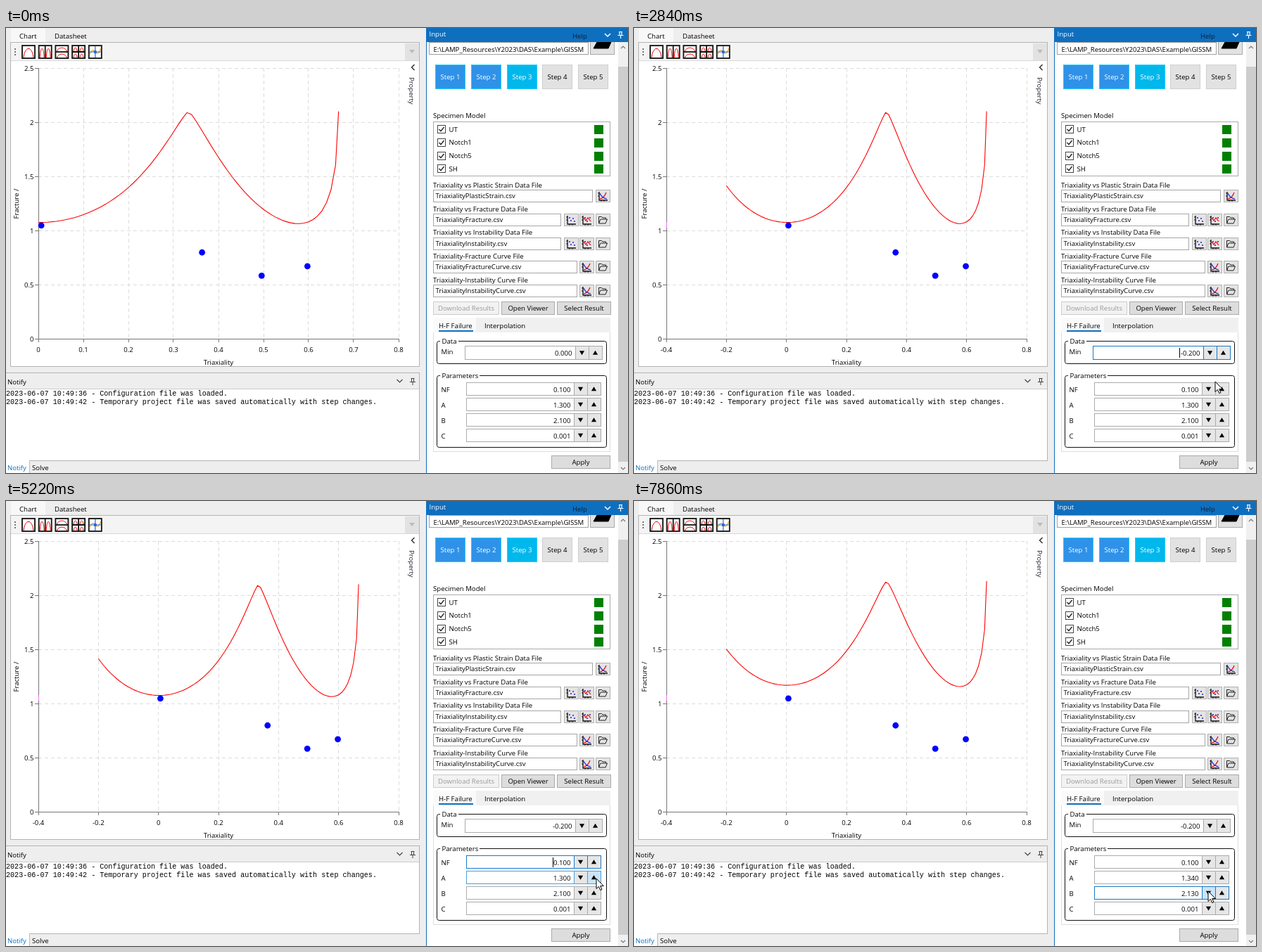
Animation, 884 px wide and 633 px high, one loop 7990 ms. Source, as an HTML page:

```html
<!DOCTYPE html>
<html lang="en">
<head>
<meta charset="utf-8">
<title>Fracture curve editor</title>
<style>
  html, body { margin: 0; width: 100%; height: 100%; overflow: hidden; background: #eee; }
  svg { display: block; width: 884px; height: 633px; }
  text { font: 9.6px "Open Sans", "Noto Sans", sans-serif; white-space: pre; }
  .log { font: 10.1px "Liberation Mono", monospace; }
</style>
</head>
<body>
<svg viewBox="0 0 884 633"><g id="still"></g><g id="live"></g></svg>
<script>
const LOOP = 7990, BLINK = 530;

// Drawing helpers; text is placed by its vertical centre, boxes by whole pixels.
const text = (x, cy, s, fill = '#000', anchor = 'start', extra = '') =>
  `<text x="${x}" y="${cy + 3.5}" fill="${fill}" text-anchor="${anchor}" ${extra}>${s}</text>`;
const rect = (x, y, w, h, fill) => `<rect x="${x}" y="${y}" width="${w}" height="${h}" fill="${fill}"/>`;
const box = (x, y, w, h, fill, stroke, rx = 0) =>
  `<rect x="${x + .5}" y="${y + .5}" width="${w - 1}" height="${h - 1}" rx="${rx}" fill="${fill}" stroke="${stroke}"/>`;
const path = (d, stroke, width = 1, fill = 'none', extra = '') =>
  `<path d="${d}" stroke="${stroke}" stroke-width="${width}" fill="${fill}" ${extra}/>`;
const at = (x, y, s) => `<g transform="translate(${x} ${y})">${s}</g>`;
const dot = (x, y, r, fill) => `<circle cx="${x}" cy="${y}" r="${r}" fill="${fill}"/>`;
const button = (x, y, w, h, label, fill = '#ddd', stroke = '#aaa', color = '#000') =>
  box(x, y, w, h, fill, stroke) + text(x + w / 2, y + h / 2, label, color, 'middle');

// Icons
const arch = (x, y, w, h) => path(`M${x} ${y + h}C${x + w * .15} ${y - h * .3} ${x + w * .85} ${y - h * .3} ${x + w} ${y + h}`, '#e00');
const frame = `<rect x="1" y="1" width="18" height="18" fill="#fff" stroke="#111" stroke-width="1.8"/>`;
const axes = path('M5 3V15H17M3.5 5H5M3.5 9H5M8 15V16.5M12 15V16.5', '#111', 1.3);
const icons = {
  curve: axes + path('M6 13Q12 12 15 4', '#e00', 1.2) + path('M6 5Q9 12 16 13', '#22c', 1.2),
  points: axes + [[8, 6], [10, 10], [13, 7], [15, 11]].map(p => dot(...p, 1, '#22c')).join(''),
  fit: axes + path('M6 6L9 10 12 6 16 11', '#e00', 1.2) + [[8, 6], [11, 11], [15, 6]].map(p => dot(...p, 1, '#22c')).join(''),
  folder: path('M4.5 14V4.5H8.5L10 6H14.5V8M4.5 14L7 8H16.5L14 14Z', '#222'),
};

function toolbar() {
  const views = [
    arch(3, 5, 14, 13),
    path('M10 1V19', '#111', 1.8) + arch(2.5, 5, 6, 13) + arch(11.5, 5, 6, 13),
    path('M1 10H19', '#111', 1.8) + arch(3, 4, 14, 5) + arch(3, 13, 14, 5),
    path('M10 1V19M1 10H19', '#111', 1.8) + [3, 12].map(x => arch(x, 4, 5, 5) + arch(x, 13, 5, 5)).join(''),
    path('M2 14Q6 4 10 10T18 5', '#e9a820', 1.3) + path('M10 2V18M2 10H18', '#2468d8', 1.2) + dot(10, 10, 2.2, '#2468d8'),
  ];
  return [29, 33, 37].map(y => rect(12, y, 2, 2, '#777')).join('') +
    views.map((v, i) => at(22 + 23.7 * i, 24, frame + v)).join('');
}

function leftSide() {
  return rect(0, 0, 597, 633, '#eee') + rect(7, 0, 49, 20, '#f8f8f8') +
    text(19, 11, 'Chart') + text(69, 11, 'Datasheet') +
    box(6, 20, 582, 462, '#fff', '#b4b4b4') + rect(7, 21, 580, 25, '#f4f4f4') + rect(7, 46, 580, 1, '#d8d8d8') +
    toolbar() + rect(567, 22, 20, 24, '#e2e2e2') + path('M573 31H581L577 36Z', 'none', 0, '#bbb') +
    path('M580.5 52L576.5 56 580.5 60', '#222', 1.3) +
    text(0, 0, 'Property', '#223', 'start', 'transform="translate(576 70) rotate(90)"') +
    text(0, 0, 'Fracture /', '#000', 'middle', 'transform="translate(14 250) rotate(-90)"') +
    text(302, 475, 'Triaxiality', '#000', 'middle') +
    box(-1, 490, 589, 126, '#fff', '#b4b4b4') + rect(0, 491, 587, 23, '#eee') + rect(0, 513, 587, 1, '#ccc') +
    text(2, 503, 'Notify') + path('M555.5 500L559.5 504 563.5 500', '#444', 1.2) +
    path('M575.5 498.5H580.5M576.5 498V503M579.5 498V503M574 503.5H582M578 504V508', '#444') +
    text(0, 519, '2023-06-07 10:49:36 - Configuration file was loaded.', '#000', 'start', 'class="log"') +
    text(0, 531, '2023-06-07 10:49:42 - Temporary project file was saved automatically with step changes.', '#000', 'start', 'class="log"') +
    rect(0, 615, 33, 18, '#fff') + rect(33, 615, 1, 18, '#bbb') +
    text(2, 625, 'Notify', '#0a70c0') + text(37, 625, 'Solve');
}

function fileRow(label, cy, name, right, kinds) {
  const y = Math.round(cy + 7);
  return text(607, cy, label) + box(607, y, right - 607, 18, '#fff', '#a6a6a6') + text(610.5, y + 8.5, name) +
    kinds.map((k, i) => {
      const x = 838 - 22.7 * (kinds.length - 1 - i);
      return at(Math.round(x), y, box(0, 0, 21, 18, '#e4e4e4', '#b0b0b0') + icons[k]);
    }).join('');
}

function group(y, h, title, gap) {
  return box(612, y, 242, h, 'none', '#111', 3) + rect(617, y - 1, gap, 4, '#fff') + text(619.5, y, title);
}

function rightSide() {
  const steps = [1, 2, 3, 4, 5].map(n => {
    const fill = n < 3 ? '#2f92e8' : n == 3 ? '#00b8ec' : '#e2e2e2';
    return button(Math.round(559.3 + 50.75 * n), 52, 43, 35, 'Step ' + n, fill, n < 4 ? '#20cdf8' : '#cfcfcf', n < 4 ? '#fff' : '#000');
  }).join('');
  const models = ['UT', 'Notch1', 'Notch5', 'SH'].map((name, i) => {
    const cy = 144.3 + 18.6 * i, y = Math.round(cy - 6);
    return box(613, y, 12, 12, '#fff', '#444') + path(`M615.5 ${y + 6}L618 ${y + 8.7} 622.5 ${y + 3}`, '#222', 1.4) +
      text(629.5, cy, name) + rect(836, y, 13, 13, '#008000');
  }).join('');
  return rect(597, 0, 287, 633, '#fff') + rect(597, 0, 1, 633, '#0f6fbf') +
    box(601, 20, 227, 18, '#fff', '#a0a0a0') + text(607.5, 30.5, 'E:\\LAMP_Resources\\Y2023\\DAS\\Example\\GISSM') +
    box(830, 16, 35, 22, '#e2e2e2', '#aaa') + path('M835 29L840 20H860L856 29Z', '#000', 1, '#000') +
    rect(597, 0, 287, 20, '#0f6fbf') + text(601.5, 8, 'Input', '#fff') + text(805, 11, 'Help', '#062038') +
    path('M851 8L855 12 859 8', '#fff', 1.5) + path('M871 5.5H876M872 5V10M875 5V10M869.5 10.5H877.5M873.5 11V15', '#fff', 1.2) +
    rect(870, 20, 14, 613, '#f0f0f0') + rect(870, 55, 14, 562, '#cdcdcd') +
    path('M874 29L877 26 880 29M874 625L877 628 880 625', '#777', 1.2) +
    steps + text(607, 124, 'Specimen Model') + box(607, 133, 252, 78, '#fff', '#aaa') + models +
    fileRow('Triaxiality vs Plastic Strain Data File', 223, 'TriaxialityPlasticStrain.csv', 834, ['curve']) +
    fileRow('Triaxiality vs Fracture Data File', 257, 'TriaxialityFracture.csv', 789, ['points', 'fit', 'folder']) +
    fileRow('Triaxiality vs Instability Data File', 290.5, 'TriaxialityInstability.csv', 789, ['points', 'fit', 'folder']) +
    fileRow('Triaxiality-Fracture Curve File', 324.3, 'TriaxialityFractureCurve.csv', 812, ['curve', 'folder']) +
    fileRow('Triaxiality-Instability Curve File', 358, 'TriaxialityInstabilityCurve.csv', 812, ['curve', 'folder']) +
    button(607, 389, 94, 19, 'Download Results', '#f2f2f2', '#ccc', '#9a9a9a') +
    button(704, 389, 76, 19, 'Open Viewer') + button(783, 389, 77, 19, 'Select Result') +
    box(607, 412, 252, 191, '#fff', '#ddd') + rect(607, 412, 252, 21, '#f0f0f0') + rect(607, 412, 61, 21, '#fafafa') +
    text(615, 423, 'H-F Failure') + text(680, 423, 'Interpolation') + rect(615, 430, 49, 2, '#0f6fbf') +
    group(445, 33, 'Data', 26) + text(618.5, 460, 'Min') + group(494, 103, 'Parameters', 56) +
    ['NF', 'A', 'B', 'C'].map((s, i) => text(618.5, 514.5 + 22 * i, s)).join('') +
    button(775, 608, 84, 19, 'Apply');
}

// Hosford-Coulomb fracture strain for plane stress
function fractureStrain(eta, n, a, b, c) {
  const cosine = Math.max(-1, Math.min(1, -13.5 * eta * (eta * eta - 1 / 3)));
  const lode = 1 - 2 / Math.PI * Math.acos(cosine);
  const f = k => 2 / 3 * Math.cos(Math.PI / 6 * k);
  const f1 = f(1 - lode), f2 = f(3 + lode), f3 = -f(1 + lode);
  const p = (u, v) => Math.abs(u - v) ** a;
  const hosford = ((p(f1, f2) + p(f2, f3) + p(f1, f3)) / 2) ** (1 / a);
  return b * ((1 + c) / (hosford + c * (2 * eta + f1 + f3))) ** (1 / n);
}

function chart(min, ...params) {
  const left = 2 * min, step = min < 0 ? .2 : .1;
  const X = v => 46 + 512 * (v - left) / (.8 - left), Y = v => 442 - 154 * v;
  const grid = d => path(d, '#dcdcdc', 1, 'none', 'stroke-dasharray="5 4"');
  const snap = v => Math.round(v) + .5;
  let out = '';
  for (let i = 0; i <= Math.round((.8 - left) / step); i++) {
    const v = Math.round((left + i * step) * 10) / 10, x = snap(X(v) - .5);
    out += (i ? grid(`M${x} 57V442`) : '') + path(`M${x} 442V447`, '#777') + text(X(v), 457, v, '#000', 'middle');
  }
  for (let v = 0; v <= 2.5; v += .5) {
    const y = snap(Y(v) - .5);
    out += (v ? grid(`M46 ${y}H558`) : '') + path(`M41 ${y}H46`, '#777') + text(39.5, Y(v), v, '#000', 'end');
  }
  out += path('M46.5 57V442.5H558', '#777');
  const etas = [];
  for (let i = Math.round(min * 100); i <= 66; i++) etas.push(i / 100);
  etas.push(2 / 3);
  const curve = etas.map(e => `${X(e).toFixed(2)} ${Y(fractureStrain(e, ...params)).toFixed(2)}`).join('L');
  out += path('M' + curve, '#f00', 1.1);
  if (min < 0) out += rect(46, 276, 1, 8, '#f6f');
  const samples = [[.0065, 1.046], [.3635, .797], [.4958, .582], [.5975, .67]];
  return out + samples.map(([x, y]) => dot(X(x), Y(y), 4.4, '#00f')).join('');
}

// Spinner clicks: time, field, new value
const start = [0, .1, 1.3, 2.1, .001];
const clicks = [
  [1980, 0, -.1], [2380, 0, -.2],
  [3890, 1, .11], [4030, 1, .12], [4490, 1, .11], [4700, 1, .1],
  [5430, 2, 1.31], [5640, 2, 1.32], [5840, 2, 1.33], [6040, 2, 1.34],
  [6840, 3, 2.11], [6980, 3, 2.12], [7120, 3, 2.13],
];
// Pointer path: time, x, y
const route = [
  [70, 844, 560], [300, 838, 520], [600, 826, 475], [830, 818, 464], [1160, 818, 464], [1230, 819, 465],
  [1370, 819, 465], [1440, 829, 464], [1650, 820, 463], [2450, 820, 463], [2840, 826, 503], [3170, 823, 509],
  [3240, 823, 512], [3440, 823, 512], [3560, 833, 516], [3890, 834, 517], [4160, 834, 517], [4420, 818, 515],
  [4760, 818, 515], [5220, 839, 537], [5430, 836, 538], [6160, 836, 538], [6290, 832, 542], [6570, 836, 552],
  [7150, 836, 553], [7350, 832, 584], [7580, 822, 560], [7860, 816, 555], [LOOP, 816, 555],
];

function pointerAt(t) {
  const i = route.findIndex(k => k[0] > t);
  if (i < 1) return null;
  const [t0, x0, y0] = route[i - 1], [t1, x1, y1] = route[i], k = (t - t0) / (t1 - t0);
  return [x0 + (x1 - x0) * k, y0 + (y1 - y0) * k];
}

function spinner(i, value, pointer, focused, caret) {
  const x = i ? 654 : 652, w = i ? 192 : 196, y = i ? 482 + 22 * i : 452, h = i ? 19 : 20, right = x + w;
  const [px, py] = pointer || [0, 0];
  const hover = px >= x && px < right && py >= y && py < y + h;
  const edge = focused ? '#1a78c4' : hover ? '#4a9fe0' : '#ababab';
  const key = (kx, d) => box(kx, y, 20, h, hover && px > kx && px <= kx + 19 ? '#cbe4f7' : '#e6e6e6', edge) +
    at(kx + 9.5, y + h / 2, path(d, 'none', 0, '#000'));
  return box(x, y, w, h, '#fff', edge) + key(right - 39, 'M-3.6 -2.8H3.6L0 3.2Z') + key(right - 20, 'M-3.6 2.8H3.6L0 -3.2Z') +
    text(right - 43.5, y + h / 2 + .5, value.toFixed(3), '#000', 'end') +
    (caret ? rect(value < 0 ? 775 : right - 69, y + 3, 1, 14, '#000') : '');
}

const arrow = path('M0 0V14.5L3.4 11.4 5.8 16.6 8 15.6 5.7 10.6H10.3Z', '#000', 1, '#fff');

function render(now) {
  const t = now % LOOP, values = [...start];
  let last = [0, -1];
  for (const click of clicks) if (click[0] <= t) { last = click; values[click[1]] = click[2]; }
  const pointer = pointerAt(t), lit = Math.floor((t - last[0]) / BLINK) % 2 == 0;
  live.innerHTML = chart(...values) +
    values.map((v, i) => spinner(i, v, pointer, i == last[1], i == last[1] && lit)).join('') +
    (pointer ? at(...pointer, arrow) : '');
  requestAnimationFrame(tick);
}

const still = document.getElementById('still'), live = document.getElementById('live');
still.innerHTML = leftSide() + rightSide();
const origin = performance.now();
const tick = () => render(performance.now() - origin);
tick();
</script>
</body>
</html>
```
